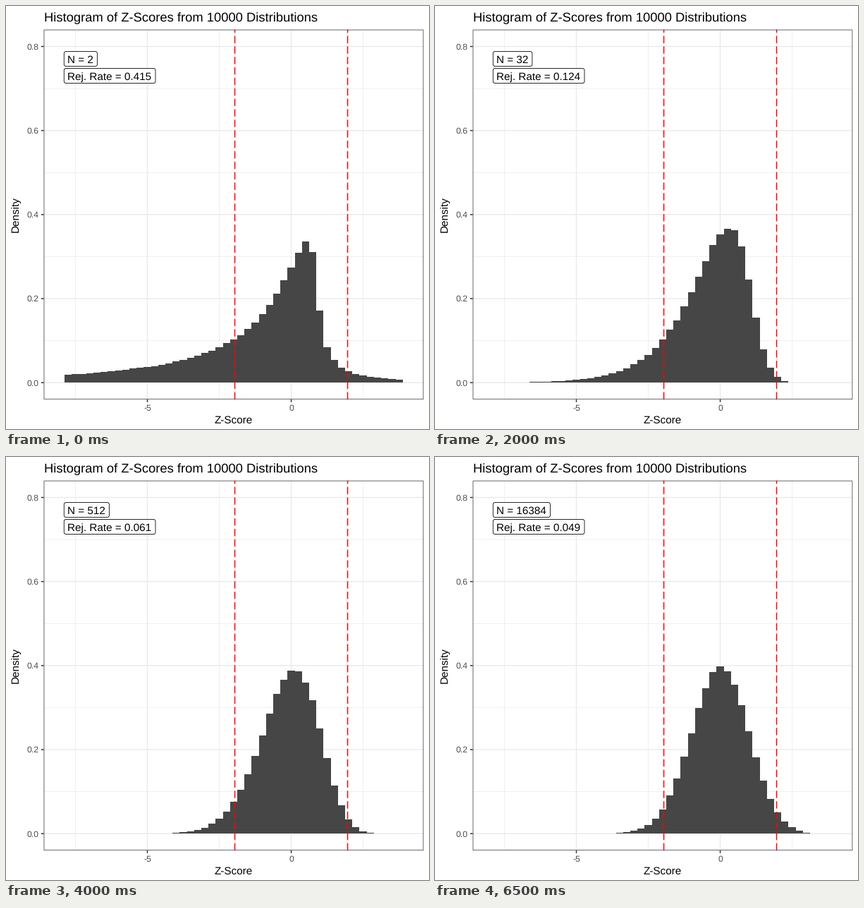
These frames come from a looping animation (600x600 px, 7 s). A matplotlib script:

```python
import numpy as np
import matplotlib.pyplot as plt
from matplotlib.animation import FuncAnimation
from matplotlib.patches import FancyBboxPatch, Polygon, Rectangle

plt.rcParams["font.family"] = ["Liberation Sans", "DejaVu Sans"]
plt.rcParams["text.hinting"] = "none"

LEFT, TOP, RIGHT, BOTTOM = 53.6, 33.6, 592.3, 558.1
LINE = 1.07
POOL = 500_000
WIDTH = 0.25
EDGES = np.arange(-7.875, 3.9, WIDTH)
RATES = [0.415, 0.308, 0.222, 0.165, 0.124, 0.096, 0.080,
         0.068, 0.061, 0.056, 0.053, 0.050, 0.050, 0.049]


def px(x):
    return LEFT + (x + 8.6) / 13.2 * (RIGHT - LEFT)


def py(y):
    return BOTTOM - (y + 0.04) / 0.88 * (BOTTOM - TOP)


def density(z):
    inside = z[(z >= -8) & (z <= 4)]
    h = np.histogram(inside, EDGES)[0] / (len(inside) * WIDTH)
    unit = 1 / (10000 * WIDTH)  # one sample out of 10000
    return np.round(h / unit) * unit


def simulate(steps):
    """Z-scores of log-normal samples; each step pairs samples up to double N."""
    rng = np.random.default_rng(5)
    mu = np.exp(0.5)
    x = rng.lognormal(size=POOL)
    x *= mu / x.mean()
    total, squares = x, x ** 2
    result = []
    for n in 2 ** np.arange(1, steps + 1):
        mate = rng.permutation(POOL)
        total, squares = total + total[mate], squares + squares[mate]
        var = np.maximum((squares - total ** 2 / n) / (n - 1), 1e-12)
        result.append(density((total / n - mu) / np.sqrt(var / n)))
    return result


def outline(h):
    xs = np.repeat(px(EDGES), 2)
    ys = py(np.concatenate([[0], np.repeat(h, 2), [0]]))
    return np.column_stack([xs, ys])


heights = simulate(len(RATES))

fig = plt.figure(figsize=(6, 6), dpi=100, facecolor="white")
ax = fig.add_axes([0, 0, 1, 1])
ax.set_xlim(0, 600)
ax.set_ylim(600, 0)
ax.axis("off")


def line(x0, y0, x1, y1, color, width, z, **kw):
    ax.plot([x0, x1], [y0, y1], color=color, lw=width, zorder=z,
            solid_capstyle="butt", dash_capstyle="butt", snap=False, **kw)


def label(x, y, text, size=11, **kw):
    return ax.text(x, y, text, size=size, va="baseline", zorder=7, **kw)


def label_box(y):
    box = FancyBboxPatch((82.3, y), 47, 21, boxstyle="round,pad=0,rounding_size=2.8",
                         fc="white", ec="black", lw=0.6, zorder=6)
    ax.add_patch(box)
    return box, label(87, y + 16.3, "")


# Grid, ticks and tick labels
for x in (-7.5, -2.5, 2.5):
    line(px(x), TOP, px(x), BOTTOM, "#EBEBEB", LINE / 2, 1)
for y in (0.1, 0.3, 0.5, 0.7):
    line(LEFT, py(y), RIGHT, py(y), "#EBEBEB", LINE / 2, 1)
for x in (-5, 0):
    line(px(x), TOP, px(x), BOTTOM, "#EBEBEB", LINE, 2)
    line(px(x), BOTTOM, px(x), BOTTOM + 3.8, "#333333", LINE, 5)
    label(px(x), 573.7, str(x), 8.8, color="#4D4D4D", ha="center")
for y in (0.0, 0.2, 0.4, 0.6, 0.8):
    line(LEFT, py(y), RIGHT, py(y), "#EBEBEB", LINE, 2)
    line(LEFT - 3.8, py(y), LEFT, py(y), "#333333", LINE, 5)
    label(46.8, py(y) + 4.3, f"{y:.1f}", 8.8, color="#4D4D4D", ha="right")

# Critical values
for x in (-1.96, 1.96):
    line(px(x), BOTTOM, px(x), TOP, "red", LINE, 4, ls=(0, (7, 3)))

# Panel border, inner half of the stroke
INSET = 0.37
ax.add_patch(Rectangle((LEFT + INSET, TOP + INSET), RIGHT - LEFT - 2 * INSET,
                       BOTTOM - TOP - 2 * INSET, fill=False, ec="#333333",
                       lw=LINE / 2, snap=False, zorder=5))

# Titles
label(LEFT, 21.3, "Histogram of Z-Scores from 10000 Distributions", 13.2)
label((LEFT + RIGHT) / 2, 592.3, "Z-Score", ha="center")
label(17.8, (TOP + BOTTOM) / 2, "Density", rotation=90, rotation_mode="anchor", ha="center")

bars = Polygon(outline(heights[0]), closed=True, fc="#464646", ec="none", zorder=3)
ax.add_patch(bars)
n_box, n_text = label_box(64.5)
rate_box, rate_text = label_box(88.5)
rate_box.set_width(129.7)


def update(i):
    n = str(2 ** (i + 1))
    bars.set_xy(outline(heights[i]))
    n_text.set_text(f"N = {n}")
    n_box.set_width(38.6 + 8.5 * len(n))
    rate_text.set_text(f"Rej. Rate = {RATES[i]:.3f}")
    return bars, n_box, n_text, rate_text


anim = FuncAnimation(fig, update, frames=len(RATES), interval=500, repeat=True,
                     repeat_delay=0, blit=False)
plt.show()
```
